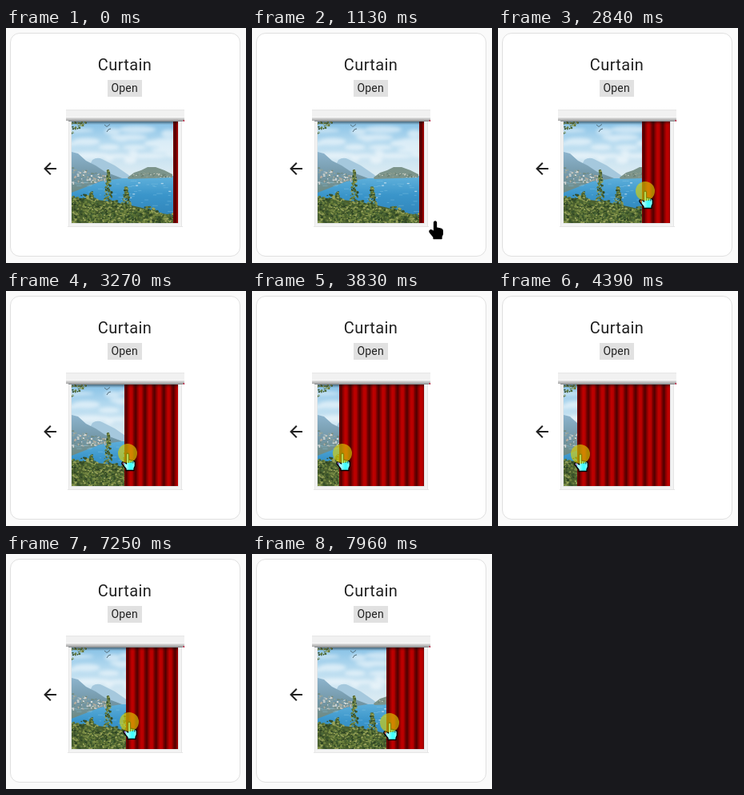
Write an HTML page that moves like this. It is 300 by 294 pixels and loops after 8000 ms.

```html
<!DOCTYPE html>
<html lang="en">
<head>
<meta charset="utf-8">
<title>Curtain card</title>
<style>
html, body { margin: 0; width: 100%; height: 100%; overflow: hidden; background: #fafafa; }
svg { display: block; width: 300px; height: 294px; }
text { font-family: Roboto, sans-serif; text-anchor: middle; fill: #212121; }
.invert { mix-blend-mode: difference; }
</style>
</head>
<body>
<svg viewBox="0 0 300 294">
  <defs>
    <linearGradient id="sky" x2="0" y2="1">
      <stop offset="0" stop-color="#86c1e6"/><stop offset=".4" stop-color="#b9dcf0"/>
      <stop offset="1" stop-color="#e0edf3"/>
    </linearGradient>
    <linearGradient id="sea" x2="0" y2="1">
      <stop offset="0" stop-color="#62b2dc"/><stop offset=".4" stop-color="#3a95ca"/>
      <stop offset="1" stop-color="#2d7fb4"/>
    </linearGradient>
    <linearGradient id="hill" x2="0" y2="1">
      <stop offset="0" stop-color="#8db4cd"/><stop offset=".6" stop-color="#7296a6"/>
      <stop offset="1" stop-color="#6f8a80"/>
    </linearGradient>
    <linearGradient id="folds" gradientUnits="userSpaceOnUse" x2="11.8" spreadMethod="repeat">
      <stop offset="0" stop-color="#780000"/><stop offset=".2" stop-color="#500000"/>
      <stop offset=".4" stop-color="#8c0000"/><stop offset=".62" stop-color="#c00000"/>
      <stop offset=".84" stop-color="#b40000"/><stop offset="1" stop-color="#780000"/>
    </linearGradient>
    <linearGradient id="rail" x2="0" y2="1">
      <stop offset="0" stop-color="#e6e6e6"/><stop offset=".14" stop-color="#f1f1f1"/>
      <stop offset=".6" stop-color="#f1f1f1"/><stop offset=".67" stop-color="#fafafa"/>
      <stop offset=".76" stop-color="#d8d8d8"/><stop offset="1" stop-color="#a4a4a4"/>
    </linearGradient>
    <linearGradient id="shade" x2="0" y2="1">
      <stop offset="0" stop-opacity=".45"/><stop offset="1" stop-opacity="0"/>
    </linearGradient>
    <filter id="soft" x="-30%" y="-50%" width="160%" height="200%"><feGaussianBlur stdDeviation="2"/></filter>
    <clipPath id="pane"><rect x="82" y="117" width="133" height="127"/></clipPath>
    <path id="pointer" d="M-1.5 12V1.5A1.5 1.5 0 0 1 1.5 1.5V8L7 9.2Q9.3 9.8 9.3 12V16L8 19V21.5H-2V19.5L-6.5 14Q-8 11.6-6 10.8Q-4.5 10.3-1.5 13Z"/>
  </defs>

  <rect width="300" height="294" fill="#fafafa"/>
  <rect x="5.5" y="6.5" width="287" height="279" rx="11.5" fill="#fff" stroke="#e0e0e0"/>
  <text x="148.6" y="53" font-size="20" letter-spacing=".4">Curtain</text>
  <rect x="127" y="65" width="43" height="21" fill="#e1e1e1"/>
  <text x="148.2" y="80" font-size="14" letter-spacing=".2">Open</text>
  <path transform="translate(43 164)" fill="#212121"
    d="M20 11V13H8L13.5 18.5L12.08 19.92L4.16 12L12.08 4.08L13.5 5.5L8 11Z"/>

  <rect x="78" y="114" width="142" height="135" fill="#f3f3f3"/>
  <path d="M78.5 115V249M219.5 115V249M77 248.5H221" stroke="#e6e6e6"/>
  <path d="M81.5 117V244.5H215.5V117" fill="none" stroke="#e3e6e8"/>

  <g clip-path="url(#pane)">
    <rect x="82" y="117" width="133" height="70" fill="url(#sky)"/>
    <g id="clouds" fill="#fff" opacity=".5" filter="url(#soft)"></g>
    <rect x="82" y="185" width="133" height="60" fill="url(#sea)"/>
    <path d="M96 188L108 165Q114 161 120 164L136 172L152 183L158 188Z" fill="#a5c8dd"/>
    <path d="M82 155L90 157L100 166L112 172L124 180L145 188L118 192L82 206Z" fill="url(#hill)"/>
    <path d="M152 187L160 181L169 178L177 174L187 174L198 178L208 183V187L153 189Z" fill="#7c948b"/>
    <g id="town"></g>
    <g id="waves" stroke="#8cc9e6" stroke-width=".7" opacity=".55"></g>
    <path d="M123 121l3 2.500l4-3M126 130l2-3l3-1" fill="none" stroke="#56707d"/>
    <path d="M82 212Q150 216 215 238V244H82Z" fill="#4b5f2e"/>
    <g id="plants"></g>
  </g>

  <g clip-path="url(#pane)">
    <rect id="curtain" y="117" width="140" height="127" fill="url(#folds)"/>
    <rect x="82" y="117" width="133" height="4" fill="url(#shade)"/>
  </g>

  <rect x="75" y="102" width="148" height="14" fill="url(#rail)"/>
  <path d="M78 116.400H221" stroke="#8f9496" stroke-width="1.4"/>
  <rect x="221.500" y="115" width="1.500" height="2" fill="#b21e3c"/>

  <use id="hand" href="#pointer" class="invert" fill="#fff"/>
  <g id="outline" fill="none" stroke="#000" stroke-width="1.3" stroke-linejoin="round">
    <use href="#pointer"/>
    <path d="M1.5 8V12M4.2 9V12M6.8 9.500V12.500" stroke-width=".8"/>
  </g>
  <circle id="touch" r="12" fill="#dfd400" fill-opacity=".62"/>
</svg>
<script>
const LOOP = 8000, BEGIN = 980, STEP = 142, PRESS = 8;
const $ = id => document.getElementById(id);

// Drag key points, timed in steps; "ease" shapes the way to each point.
const linear = k => k;
const easeIn = k => k ** 1.5;
const easeOut = k => 1 - (1 - k) ** 2;
const DRAG = [
  { at: 8, x: 213, y: 206 },
  { at: 11, x: 206, y: 204, ease: linear },
  { at: 19, x: 119, y: 202, ease: linear },
  { at: 24, x: 103, y: 204, ease: easeOut },
  { at: 39, x: 103, y: 204, ease: linear },
  { at: 41, x: 117, y: 209, ease: easeIn },
  { at: 45, x: 166, y: 210, ease: linear },
  { at: 49, x: 172, y: 211, ease: easeOut }
];

function pointerAt(step) {
  if (step < PRESS) return [213 + 38 * .42 ** step, 206 + 66 * .55 ** step];
  const i = DRAG.findIndex(p => p.at > step);
  const b = DRAG.at(i), a = DRAG.at(i - 1);
  const k = i < 0 ? 1 : b.ease((step - a.at) / (b.at - a.at));
  return [a.x + (b.x - a.x) * k, a.y + (b.y - a.y) * k];
}

let seed = 11;
const rnd = () => (seed = seed * 16807 % 2147483647) / 2147483647;
const range = (a, b) => a + (b - a) * rnd();
const pick = list => list[Math.floor(rnd() * list.length)];
const fill = (id, n, make) => {
  let html = '';
  for (let i = 0; i < n; i++) html += make(i / n);
  $(id).innerHTML += html;
};

const GREENS = ['#37502a', '#566f32', '#7c8f46', '#2e4424', '#98a35a', '#4a6636', '#6b7f3c'];
const leaf = (x, y, r) =>
  `<ellipse cx="${x}" cy="${y}" rx="${r}" ry="${r * .8}" fill="${pick(GREENS)}"/>`;
const block = (x, y, w, h, color) =>
  `<rect x="${x}" y="${y}" width="${w}" height="${h}" fill="${color}"/>`;

const tree = (x, top, width) => fill('plants', 190, k =>
  leaf(x + range(-1, 1) * (1 + width * k), top + (246 - top) * k, range(.6, 1.6)));

function drawScene() {
  fill('clouds', 26, () =>
    `<ellipse cx="${range(82, 215)}" cy="${range(126, 168)}" rx="${range(6, 24)}" ry="${range(2, 5)}"/>`);
  fill('town', 110, () => {
    const x = range(82, 125);
    return block(x, range(172 + (x - 82) * .3, 196 - (x - 82) * .1), range(1, 3), range(.8, 2),
      pick(['#e4e4de', '#c9d0d0', '#b3aca0', '#71897d', '#8ea39d']));
  });
  fill('town', 50, () => block(range(156, 206), range(181, 187), 1.6, 1, pick(['#c9cdc2', '#64796a', '#93a091'])));
  fill('waves', 55, () => `<path d="M${range(82, 208)} ${range(189, 230)}h${range(2, 9)}"/>`);
  fill('waves', 6, () => `<path d="M${range(150, 208)} ${range(193, 216)}h3" stroke="#fff" stroke-width="1.3"/>`);
  fill('plants', 1000, () => {
    const x = range(80, 217), top = 207 + (x - 82) * .2 + 3 * Math.sin(x / 6);
    return leaf(x, range(top, 246), range(.7, 2));
  });
  tree(107, 205, 9);
  tree(150, 199, 10);
  tree(128, 178, 8);
  fill('plants', 50, () => {
    const a = rnd();
    return leaf(82 + a * 18, 117 + rnd() * (16 - 13 * a), range(.5, 1.3));
  });
}

const move = (el, x, y) => el.setAttribute('transform', `translate(${x} ${y})`);

function render(t) {
  const step = Math.floor((t - BEGIN) / STEP);
  const [x, y] = pointerAt(Math.max(step, 0)).map(Math.round);
  for (const [id, from] of [['hand', 0], ['outline', 0], ['touch', PRESS]]) {
    $(id).setAttribute('visibility', step >= from ? 'visible' : 'hidden');
    move($(id), x, y);
  }
  move($('curtain'), Math.min(209, x - 4), 0);
}

drawScene();
const start = performance.now();
(function tick() {
  render((performance.now() - start) % LOOP);
  requestAnimationFrame(tick);
})();
</script>
</body>
</html>
```
